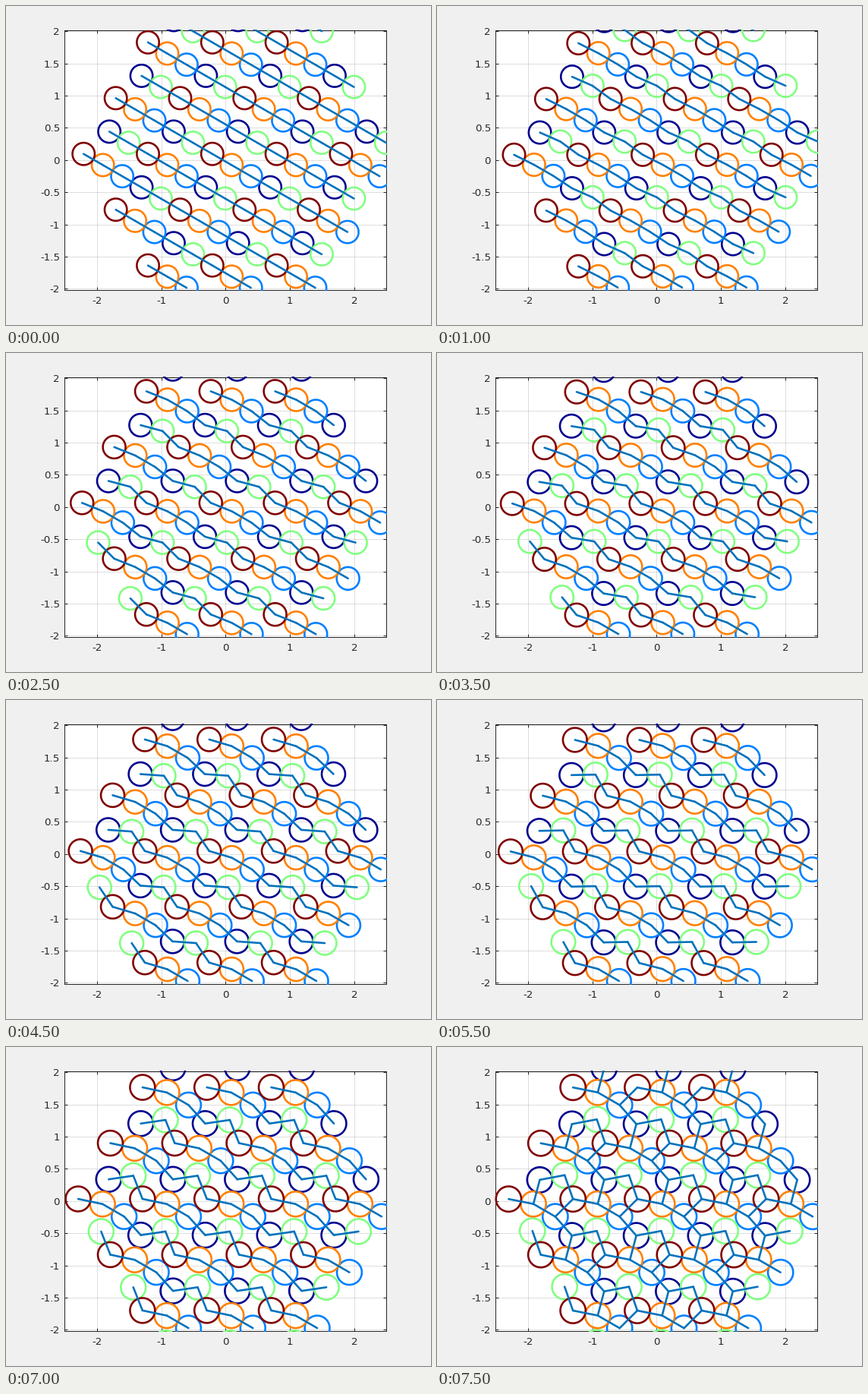
These frames come from a looping animation (560x420 px, 8000 ms). A matplotlib script:

```python
import numpy as np
import matplotlib.pyplot as plt
from matplotlib.animation import FuncAnimation
from matplotlib.collections import LineCollection
from matplotlib.transforms import Bbox

W, H, DPI = 560, 420, 100
PX = 72 / DPI                      # points per pixel
FRAMES, STEP = 16, 500
INK = (0.15, 0.15, 0.15)
BOND = "#0072BD"
COLORS = [(0, 0, 0.5625), (0, 0.5, 1), (0.5, 1, 0.5), (1, 0.5, 0), (0.5, 0, 0)]

ROW = np.sqrt(3) / 2
SPAN = np.sqrt(3)                  # length of one chain period
CENTER = np.array([0.393, -0.252])
WRAP_FRAME, CONTACT_FRAME = 3, 15

# Hexagonal patch of 19 lattice cells
CELLS = np.array([(i + j / 2, j * ROW)
                  for j in range(-2, 3) for i in range(-2, 3) if abs(i + j) <= 2])

# Particles along the chain: red, orange, blue, navy, green
CHAIN_COLOR = [4, 3, 1, 0, 2]
CHAIN_BONDS = [(k, (k + 1) % 5) for k in range(5)]
EXTRA_BONDS = [(3, 1), (0, 2)]

phi = np.linspace(0, 2 * np.pi, 61)
RING = np.column_stack([np.cos(phi), np.sin(phi)])


def chain(n):
    """Bond length and the five particle positions, folded into the home cell."""
    t = n * STEP / 1000
    a = 6.3 * t - 0.117 * t * t
    b = 0.56 * a - 6e-5 * a ** 3
    bend = np.radians([-b, 0, b, -a, a])
    d = SPAN / np.cos(bend).sum()
    ang = -np.pi / 6 - bend
    steps = d * np.column_stack([np.cos(ang), np.sin(ang)])
    pos = np.vstack([[0, 0], np.cumsum(steps[:4], axis=0)])
    pos += CENTER - pos.mean(axis=0)
    pos[3] += (-0.5, ROW)
    pos[4] += (-0.5, ROW) if n < WRAP_FRAME else (-1, 0)
    return d, pos


def touching(p, q, d):
    gap = np.linalg.norm(p[:, None] - q[None], axis=2)
    return [(p[i], q[j]) for i, j in np.argwhere(gap < 1.04 * d)]


plt.rcParams.update({"font.family": "DejaVu Sans", "axes.unicode_minus": False})
fig = plt.figure(figsize=(W / DPI, H / DPI), dpi=DPI, facecolor=(0.94,) * 3)
left, bottom, width, height = 77.4, 46.2, 424, 342.1
ax = fig.add_axes([left / W, bottom / H, width / W, height / H])
y_max = 2.5 * height / width
ax.set_xlim(-2.5, 2.5)
ax.set_ylim(-y_max, y_max)
ax.set_axisbelow(True)
ax.grid(color=INK, alpha=0.15, linewidth=PX)

ticks = np.arange(-2, 2.1, 0.5)
ax.set_xticks(ticks[::2], [f"{v:g}" for v in ticks[::2]])
ax.set_yticks(ticks, [f"{v:g}" for v in ticks])
ax.tick_params(direction="in", top=True, right=True, length=4.3 * PX, width=PX,
               color=INK, labelcolor=INK, labelsize=13.33 * PX)
ax.tick_params(axis="x", pad=8 * PX)
ax.tick_params(axis="y", pad=6.5 * PX)
for spine in ax.spines.values():
    spine.set(color=INK, linewidth=PX)

rings = LineCollection([], linewidths=2.6 * PX, zorder=3)
bonds = LineCollection([], linewidths=2.6 * PX, colors=BOND, zorder=4,
                       capstyle="round")
clip = Bbox.from_bounds(left - 1, bottom - 1, width + 2, height + 2)
for col in (rings, bonds):
    ax.add_collection(col, autolim=False)
    col.set_clip_box(clip)


def draw(n):
    d, home = chain(n)
    pts = [CELLS + h for h in home]
    order = np.argsort(CHAIN_COLOR)
    rings.set_segments([c + d / 2 * RING for k in order for c in pts[k]])
    rings.set_color([COLORS[CHAIN_COLOR[k]] for k in order for _ in CELLS])
    pairs = CHAIN_BONDS + (EXTRA_BONDS if n >= CONTACT_FRAME else [])
    bonds.set_segments([s for i, j in pairs for s in touching(pts[i], pts[j], d)])
    return rings, bonds


anim = FuncAnimation(fig, draw, frames=FRAMES, interval=STEP, repeat=True,
                     repeat_delay=0, init_func=lambda: draw(0))
plt.show()
```
